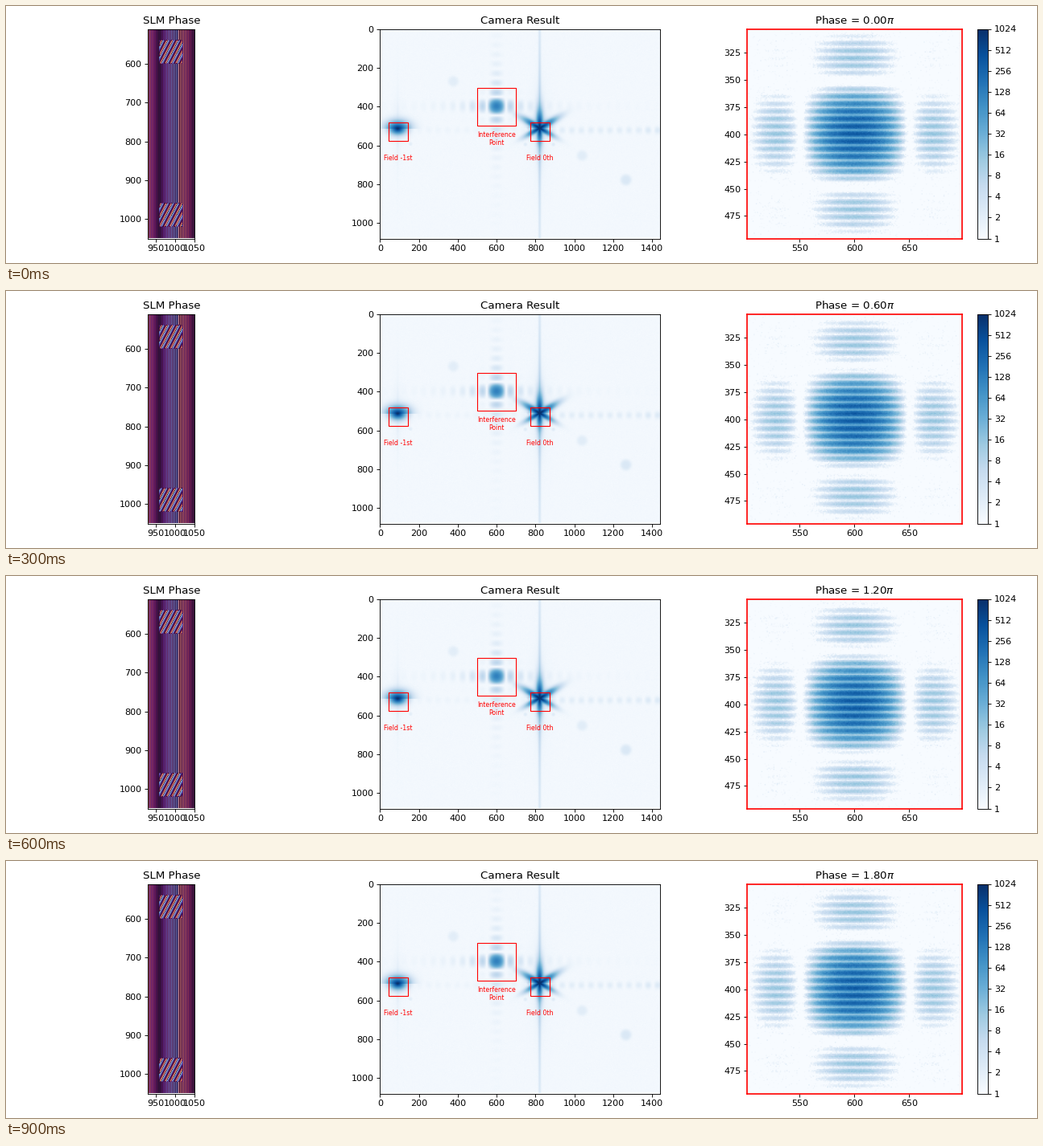
These frames come from a looping animation (1280x320 px, 1000 ms). A matplotlib script:

```python
import numpy as np
import matplotlib.pyplot as plt
from matplotlib.animation import FuncAnimation
from matplotlib.colors import LogNorm
from matplotlib.patches import Rectangle

W, H, DPI = 1280, 320, 80
STEPS = 10
TOP, BOTTOM = 28.5, 289.5
CX, CY = 600, 400            # interference point on the camera
NULL_X, NULL_Y = 50, 48.5    # first zeros of the diffraction envelope
FRINGES = 7                  # fringes per vertical zero spacing
PEAK = 340

plt.rcParams["font.family"] = "DejaVu Sans"
fig = plt.figure(figsize=(W / DPI, H / DPI), dpi=DPI)


def add_axes(left, right):
    return fig.add_axes([left / W, 1 - BOTTOM / H, (right - left) / W, (BOTTOM - TOP) / H])


def envelope(x, y):
    return np.sinc((x - CX) / NULL_X) ** 2 * np.sinc((y - CY) / NULL_Y) ** 2


def gauss(x, y, cx, cy, sx, sy):
    return np.exp(-((x - cx) / sx) ** 2 - ((y - cy) / sy) ** 2)


def slm_phase(phase):
    """Vertical carrier grating with two tilted patches; the lower one is shifted."""
    y, x = np.mgrid[510:1050, 930:1050]
    out = 2 * np.pi * x / 4.04
    tilted = 2 * np.pi * (x / 13.4 + y / 26)
    inside = (x >= 960) & (x < 1019)
    upper = inside & (y >= 540) & (y < 600)
    lower = inside & (y >= 960) & (y < 1020)
    out[upper] = tilted[upper]
    out[lower] = tilted[lower] + phase
    return out % (2 * np.pi)


def camera_image():
    rng = np.random.default_rng(4)
    y, x = np.mgrid[2:1080:4, 2:1440:4].astype(float)
    img = 1.17 + 0.04 * rng.standard_normal(x.shape)
    img += 0.35 * PEAK * envelope(x, y)

    # zeroth order: six-armed core, streak and halo
    dx, dy = x - 822, y - 513
    r, ang = np.hypot(dx, dy), np.arctan2(dy, dx)
    decay = (0.115 + 0.045 * np.cos(6 * ang)) * np.where(dy > 0, 1.25, 1)
    img += 2 ** (10.9 - r * decay)
    img += 60 * np.exp(-np.abs(dx) / 6 - np.abs(dy) / 60)
    img += 4.5 * np.exp(-(dx / 6) ** 2 - np.abs(dy) / 480)
    img += 1.5 * np.exp(-np.abs(dx) / 28 - np.abs(dy) / 130)

    # minus first order: wide top, narrow bottom
    dx, dy = x - 93, y - 515
    r = np.hypot(dx * np.where(dy > 0, 1.1, 0.8), dy * np.where(dy > 0, 1.5, 1.2))
    img += 2 ** (10.4 - 0.135 * r)
    img += 1.6 * np.exp(-np.abs(dx) / 14 - np.abs(dy) / 70)
    img += 0.35 * np.exp(-(dx / 5) ** 2 - np.abs(dy) / 160)

    # row of weak side orders
    row = np.exp(-((y - 524) / 16) ** 2) * np.cos(np.pi * (x - 840) / 49) ** 2
    img += row * np.where(x > 850, 0.9 + 0.5 * (x > 1340), 0.25)

    # ghost spots
    for cx, cy, size, level in [(378, 272, 26, 0.9), (1040, 655, 26, 1.0),
                                (1265, 780, 27, 1.6), (158, 595, 9, 0.8),
                                (892, 597, 9, 1.0), (748, 597, 9, 0.9),
                                (765, 512, 9, 2.5), (885, 470, 10, 1.5)]:
        img += level * np.exp(-(np.hypot(x - cx, y - cy) / size) ** 4)
    return np.clip(img, 1, 1024)


def zoom_image(step):
    rng = np.random.default_rng(100 + step)
    y, x = np.mgrid[304:496, 502:698].astype(float)
    arg = 2 * np.pi * FRINGES * (y - CY) / NULL_Y - 2 * np.pi * step / STEPS
    img = PEAK * envelope(x, y) * (1 + 0.8 * np.cos(arg)) / 1.8
    img *= np.exp(0.12 * rng.standard_normal(x.shape))
    img += 0.25 + 0.45 * rng.standard_normal(x.shape)
    return np.clip(img, 1, 1024)


norm = LogNorm(1, 1024)

slm = add_axes(176.3, 234.3)
slm_im = slm.imshow(slm_phase(0), cmap="twilight", vmin=0, vmax=2 * np.pi,
                    extent=(930, 1050, 1050, 510), aspect="auto")
slm.set_xticks([950, 1000, 1050])
slm.set_yticks(range(600, 1001, 100))
slm.set_title("SLM Phase")

cam = add_axes(464.3, 811.8)
cam.imshow(camera_image(), cmap="Blues", norm=norm,
           extent=(-0.5, 1439.5, 1079.5, -0.5), aspect="auto")
cam.set_xticks(range(0, 1401, 200))
cam.set_yticks(range(0, 1001, 200))
cam.set_title("Camera Result")
for x, y, w, h in [(43, 480, 100, 97), (773, 480, 100, 97), (500, 304, 200, 194)]:
    cam.add_patch(Rectangle((x, y), w, h, fill=False, ec="red", lw=1))
for x, y, label in [(93, 664, "Field -1st"), (820, 664, "Field 0th"),
                    (600, 567, "Interference\nPoint")]:
    cam.text(x, y, label, color="red", fontsize=7, ha="center", va="center")

zoom = add_axes(920.2, 1186.7)
zoom_im = zoom.imshow(zoom_image(0), cmap="Blues", norm=norm,
                      extent=(502, 698, 495.6, 303.6), aspect="auto")
zoom.set_xticks([550, 600, 650])
zoom.set_yticks(range(325, 476, 25))
zoom_title = zoom.set_title(r"Phase = 0.00$\pi$")
for spine in zoom.spines.values():
    spine.set(color="red", linewidth=1.5)

bar = fig.colorbar(zoom_im, cax=add_axes(1206.3, 1219.3),
                   ticks=[2 ** k for k in range(11)], format="%d")
bar.minorticks_off()


def update(step):
    slm_im.set_data(slm_phase(2 * np.pi * step / STEPS))
    zoom_im.set_data(zoom_image(step))
    zoom_title.set_text(rf"Phase = {2 * step / STEPS:.2f}$\pi$")
    return slm_im, zoom_im, zoom_title


anim = FuncAnimation(fig, update, frames=STEPS, interval=100, repeat=True, repeat_delay=0)
plt.show()
```
